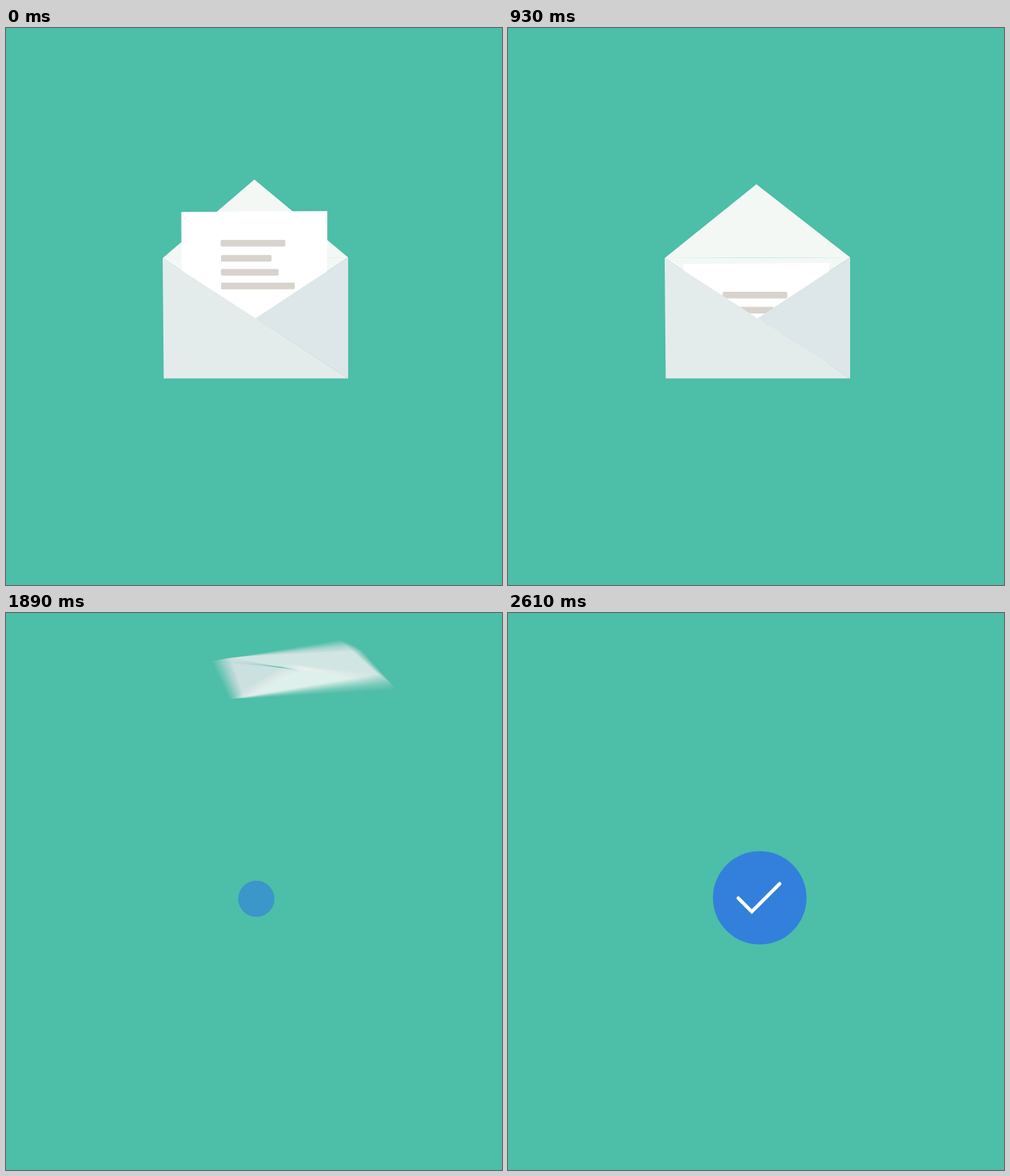
Animation, 706 px wide and 794 px high, one loop 3.72 s. Source, as an HTML page with a canvas:

```html
<!DOCTYPE html>
<html lang="en">
<head>
<meta charset="utf-8">
<title>Message sent</title>
<style>
  html, body { margin: 0; width: 100%; height: 100%; overflow: hidden; background: #4dbea8; }
  canvas { display: block; }
</style>
</head>
<body>
<canvas id="stage" width="706" height="794"></canvas>
<script>
const W = 706, H = 794, LOOP = 3720, STEP = 30;
const TEAL = '#4dbea8', BLUE = '#3280dc', FLAP = '#f3f8f5';
const stage = document.getElementById('stage').getContext('2d');
const layer = Object.assign(document.createElement('canvas'), { width: W, height: H });
const sample = layer.getContext('2d');

const TL = [223, 328], TR = [487, 327], BR = [487, 499.5], BL = [224.5, 499.5], MID = [355, 414];
const CENTER = [355, 413];
const BARS = [[305.5, 302, 92], [306, 323.5, 72], [306, 343.5, 82], [306, 363, 105]];

const FLIGHT_START = 1590, FLIGHT_END = 2130;
const SHUTTER = 0.75, SAMPLES = 16;

// Flight keys: [step, value, velocity per step]
const FLIGHT = {
  x: [[0, 355, 0], [5, 568, 41], [10, 417, -32], [18, -110, -90]],
  y: [[0, 413, 0], [5, 348, -44], [10, 82, -7], [18, 20, -8]],
  turn: [[0, 0, 0], [5, -50, -45], [10, -196, -8], [18, -205, 0]],
  major: [[0, 1, 0], [5, 0.956, -0.02], [10, 0.79, -0.02], [18, 0.65, 0]],
  minor: [[0, 1, 0], [5, 0.57, -0.06], [10, 0.33, -0.02], [18, 0.3, 0]],
  axis: [[0, 26, 0], [5, 26, 0], [10, 16, 0], [18, 16, 0]],
  taper: [[0, 0, 0], [5, 0.11, 0], [10, -0.14, 0], [18, -0.14, 0]],
  alpha: [[0, 1, 0], [5, 1, 0], [10, 0.9, -0.05], [18, 0, -0.1]]
};

const clamp = v => Math.min(1, Math.max(0, v));
const mix = (a, b, u) => a + (b - a) * u;
const ease = (t, from, to) => {
  const u = clamp((t - from) / (to - from));
  return u * u * (3 - 2 * u);
};

function hermite(keys, s) {
  s = Math.min(18, Math.max(0, s));
  const i = s < 5 ? 0 : s < 10 ? 1 : 2;
  const [s0, a, va] = keys[i], [s1, b, vb] = keys[i + 1];
  const d = s1 - s0, u = (s - s0) / d, w = 1 - u;
  return mix(a, b, u * u * (3 - 2 * u)) + d * (va * u * w * w - vb * u * u * w);
}

function polygon(ctx, color, points) {
  ctx.fillStyle = color;
  ctx.beginPath();
  points.forEach(p => ctx.lineTo(...p));
  ctx.fill();
}

function background(ctx) {
  ctx.globalAlpha = 1;
  ctx.fillStyle = TEAL;
  ctx.fillRect(0, 0, W, H);
}

function drawLetter(ctx, shift) {
  ctx.save();
  ctx.translate(0, shift);
  polygon(ctx, '#fff', [[249.5, 262.3], [457.3, 261], [457.3, 417], [250, 417]]);
  ctx.fillStyle = '#d8d4cd';
  for (const [x, y, width] of BARS) {
    ctx.beginPath();
    ctx.roundRect(x, y, width, 9.6, 2);
    ctx.fill();
  }
  ctx.restore();
}

function drawPocket(ctx, place) {
  polygon(ctx, '#dde6e8', [TR, BR, MID].map(place));
  polygon(ctx, '#e4eceb', [TL, BR, BL].map(place));
}

function drawDesk(ctx, t) {
  const lift = 3 * ease(t, 630, 900), close = ease(t, 870, 1350);
  const tip = [mix(353.5, 354.5, close), mix(216 - lift, 437, close)];
  const flap = () => polygon(ctx, FLAP, [TL, tip, TR]);
  const closed = tip[1] > 327;
  if (!closed) flap();
  polygon(ctx, FLAP, [TL, MID, TR]);
  drawLetter(ctx, 74 * ease(t, 0, 555));
  drawPocket(ctx, p => p);
  if (closed) flap();
}

// Turns the envelope and foreshortens it along a tilted axis of its own.
function drawFlying(ctx, s) {
  const pose = {};
  for (const name in FLIGHT) pose[name] = hermite(FLIGHT[name], s);
  const rad = Math.PI / 180;
  const matrix = new DOMMatrix()
    .translate(pose.x, pose.y)
    .rotate(pose.turn + pose.axis)
    .scale(pose.major, pose.minor)
    .rotate(-pose.axis);
  const place = ([px, py]) => {
    const y = py - CENTER[1];
    const x = (px - CENTER[0]) * (1 + pose.taper * y / 172);
    const q = matrix.transformPoint({ x, y });
    return [q.x, q.y];
  };
  ctx.globalAlpha = clamp(pose.alpha);
  drawPocket(ctx, place);
  polygon(ctx, FLAP, [TL, [354.5, 437], TR].map(place));
  ctx.globalAlpha = 1;
}

// Running average of moments within the open shutter.
function drawFlight(t) {
  const s = (t - FLIGHT_START) / STEP;
  for (let i = 0; i < SAMPLES; i++) {
    background(sample);
    drawFlying(sample, s + SHUTTER * (i / (SAMPLES - 1) - 0.5));
    stage.globalAlpha = 1 / (i + 1);
    stage.drawImage(layer, 0, 0);
  }
  stage.globalAlpha = 1;
}

function drawBadge(t) {
  const grow = ease(t, 1680, 2270);
  const radius = 89 * grow - 22.4 * ease(t, 2270, 2610);
  if (radius <= 0) return;
  stage.save();
  stage.translate(mix(355.5, 358.3, grow), mix(408, 406, grow));
  stage.scale(radius / 66.6, radius / 66.6);
  stage.globalAlpha = clamp((t - 1680) / 330);
  stage.fillStyle = BLUE;
  stage.beginPath();
  stage.arc(0, 0, 66.6, 0, 2 * Math.PI);
  stage.fill();
  drawCheck(ease(t, 2070, 2400));
  stage.restore();
}

function drawCheck(progress) {
  if (progress <= 0) return;
  const short = clamp(progress * 83 / 27), long = clamp((progress * 83 - 27) / 56);
  stage.strokeStyle = '#fff';
  stage.lineWidth = 5;
  stage.lineCap = 'round';
  stage.lineJoin = 'miter';
  stage.beginPath();
  stage.moveTo(-30.5, 0.5);
  stage.lineTo(mix(-30.5, -11.3, short), mix(0.5, 19.7, short));
  if (long > 0) stage.lineTo(mix(-11.3, 28.3, long), mix(19.7, -20, long));
  stage.stroke();
}

function frame(now) {
  const t = Math.floor(now % LOOP / STEP) * STEP;
  background(stage);
  if (t <= FLIGHT_START) drawDesk(stage, t);
  else if (t < FLIGHT_END) drawFlight(t);
  drawBadge(t);
  requestAnimationFrame(frame);
}
requestAnimationFrame(frame);
</script>
</body>
</html>
```
